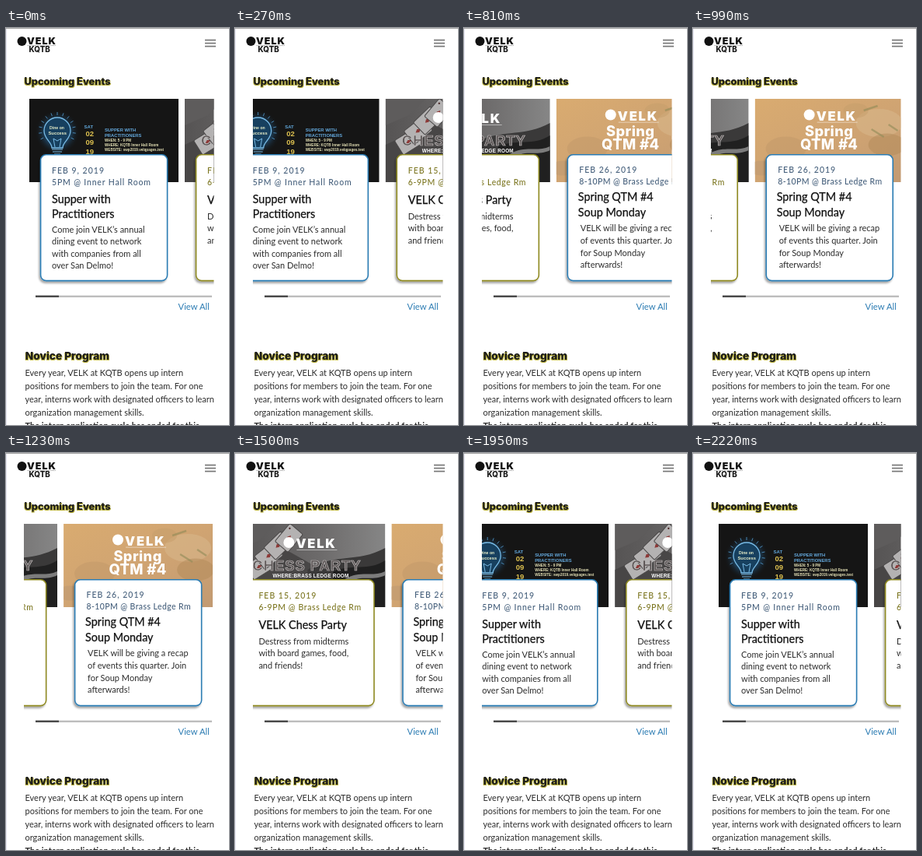
Animation of 287 by 510 pixels, one loop 2250 ms. Source, as an HTML page:

```html
<!DOCTYPE html>
<html lang="en">
<head>
<meta charset="utf-8">
<title>Upcoming Events</title>
<style>
  html, body { margin: 0; width: 100%; height: 100%; overflow: hidden; background: #fff; }
  svg { display: block; width: 287px; height: 510px; }
  text { font-family: Lato, "Open Sans", sans-serif; font-size: 11px; fill: #2c2c2c; white-space: pre; }
  .logo { font-family: Inter, sans-serif; font-weight: 900; fill: #111; }
  .head { font-family: Inter, sans-serif; font-weight: 800; fill: #1c1c1c; }
  .gold { fill: #b9b13a; }
  .title { font-size: 14.4px; fill: #111; stroke: #111; stroke-width: .25px; }
  .when { font-size: 10.5px; font-weight: 500; }
  .tiny { font-family: "Liberation Sans", Arial, sans-serif; font-weight: bold; }
  .white { fill: #fff; }
</style>
</head>
<body>
<svg viewBox="0 0 287 510">
  <defs>
    <clipPath id="view"><rect x="23" y="88" width="244.5" height="246"/></clipPath>
    <clipPath id="photo"><rect y="91" width="192" height="107"/></clipPath>
    <linearGradient id="grey">
      <stop offset="0" stop-color="#565454"/><stop offset=".55" stop-color="#6c6a6a"/><stop offset="1" stop-color="#868686"/>
    </linearGradient>
    <linearGradient id="tan" x2="1" y2="1">
      <stop offset="0" stop-color="#d9ab70"/><stop offset=".5" stop-color="#d0a472"/><stop offset="1" stop-color="#c29a72"/>
    </linearGradient>
    <radialGradient id="glow">
      <stop offset="0" stop-color="#2a5f88"/><stop offset=".6" stop-color="#1c3a52"/><stop offset="1" stop-color="#141414" stop-opacity="0"/>
    </radialGradient>
    <filter id="shade" x="-10%" y="-10%" width="120%" height="120%">
      <feDropShadow dx="-1.5" dy="2.5" stdDeviation="1.2" flood-color="#000" flood-opacity=".35"/>
    </filter>
  </defs>
  <g id="page"></g>
  <g clip-path="url(#view)"><g id="track"></g></g>
</svg>
<script>
const LOOP = 2250, PITCH = 200;
const BLUE = '#2c7cb3', OLIVE = '#8f8a22', SLATE = '#46607c';

const text = (x, y, str, cls = '', attrs = '') =>
  `<text x="${x}" y="${y}" class="${cls}" style="${attrs}">${str}</text>`;
const lines = (x, y, step, rows, cls, attrs) =>
  rows.map((row, i) => text(x, y + i * step, row, cls, attrs)).join('');
const rect = (x, y, w, h, fill, rest = '') =>
  `<rect x="${x}" y="${y}" width="${w}" height="${h}" fill="${fill}" ${rest}/>`;
const dot = (x, y, r, fill) => `<circle cx="${x}" cy="${y}" r="${r}" fill="${fill}"/>`;
const path = (d, fill, rest = '') => `<path d="${d}" fill="${fill}" ${rest}/>`;

const heading = (x, y, size, str) =>
  [[-.8, 1], [.9, 1.1]].map(([dx, dy]) => text(x + dx, y + dy, str, 'head gold', `font-size:${size}px`)).join('') +
  text(x, y, str, 'head', `font-size:${size}px`);

const whiteLogo = (x, y) => dot(x, y - 7, 7, '#fff') +
  text(x + 9, y, 'VELK', 'logo white', 'font-size:16.5px;letter-spacing:1.8px') +
  rect(x + 10, y + 2.2, 52, .8, '#fff', 'opacity=".6"');

function supperPoster() {
  let rays = '';
  for (let i = 0; i < 13; i++) {
    const a = Math.PI * (.85 + i * 1.3 / 12), c = Math.cos(a), s = Math.sin(a);
    rays += `M${36 + 20 * c} ${132 + 20 * s}L${36 + 24 * c} ${132 + 24 * s}`;
  }
  return rect(0, 91, 192, 107, '#151515') +
    dot(36, 134, 29, 'url(#glow)') +
    path(rays, 'none', 'stroke="#4d92c4" stroke-width=".9"') +
    path('M29 154C29 146 19 143 19 132A17 17 0 0 1 53 132C53 143 43 146 43 154Z', '#17405f', 'stroke="#78bbe6" stroke-width="1.3"') +
    path('M29 156H43M30 159H42M32 162H40M33 153L31 142L36 145L41 142L39 153', 'none', 'stroke="#78bbe6" stroke-width="1"') +
    text(26, 130, 'Dine on', 'tiny', 'font-size:5.2px;fill:#e6edc8') +
    text(24.5, 136.5, 'Success', 'tiny', 'font-size:5.8px;fill:#e6edc8') +
    text(70.5, 129, 'SAT', 'tiny', 'font-size:6px;fill:#62a8dc') +
    lines(72.5, 139, 11.4, ['02', '09', '19'], 'tiny', 'font-size:9.5px;fill:#dcc050') +
    lines(97, 133, 7, ['SUPPER WITH', 'PRACTITIONERS'], 'tiny', 'font-size:5.8px;fill:#64a9dd') +
    lines(97, 146.4, 5.7, ['WHEN: 5 - 9 PM', 'WHERE: KQTB Inner Hall Room', 'WEBSITE: swp2019.velqpages.test'],
      'tiny', 'font-size:4.6px;fill:#e3dfb4');
}

function chessPoster() {
  const card = (x, y, a) => `<g transform="translate(${x} ${y}) rotate(${a})">` +
    rect(-11, -15, 22, 30, '#b4b2b2', 'rx="2" stroke="#4a4848" stroke-width="1"') +
    path('M0 -4L2.5 0L0 4L-2.5 0Z', '#8d3a38') + dot(-7, -10, 1.2, '#4a2a2a') + '</g>';
  return rect(0, 91, 192, 107, 'url(#grey)') +
    path('M0 125L30 112L52 91H0Z', '#5e5c5c') +
    path('M0 198V150L60 122L110 150V198Z', '#484646') +
    card(30, 146, 58) + card(42, 132, 52) + card(54, 119, 46) + card(68, 109, 40) +
    path('M92 150C125 128 155 142 192 122V198H92Z', '#3a3939') +
    path('M125 152C150 142 170 152 192 138V198H125Z', '#202020') +
    path('M140 162C160 150 175 160 192 152V157C176 165 160 156 146 166Z', '#7c7c7c') +
    whiteLogo(68, 122) +
    text(21, 151, 'CHESS PARTY', 'tiny', 'font-size:18.5px;letter-spacing:.9px;fill:#5c5656;stroke:#c4c0c0;stroke-width:.7px') +
    text(47, 159.5, 'WHERE:BRASS LEDGE ROOM', 'tiny white', 'font-size:6.4px;letter-spacing:.2px');
}

function springPoster() {
  const blobs = [[40, 155, 26, '#c39a6a'], [160, 122, 30, '#d9b88c'], [170, 150, 24, '#b58c5c'],
    [130, 106, 16, '#c69e6c'], [8, 180, 16, '#bd9a74']];
  return rect(0, 91, 192, 107, 'url(#tan)') +
    blobs.map(([x, y, r, fill]) => `<ellipse cx="${x}" cy="${y}" rx="${r}" ry="${r * .6}" fill="${fill}" opacity=".55"/>`).join('') +
    path('M140 106L158 100M150 130L166 140M172 124L184 132', 'none', 'stroke="#8f8a58" stroke-width="2.5" opacity=".6"') +
    whiteLogo(70, 118.5) +
    lines(95.5, 138.5, 17, ['Spring', 'QTM #4'], 'head white', 'font-size:18.3px;letter-spacing:.4px;text-anchor:middle');
}

const panel = (i, poster, edge, copy) => `<g transform="translate(${i * PITCH} 0)">
  <g clip-path="url(#photo)">${poster}</g>
  ${rect(14.6, 162.8, 163, 161.8, '#fff', `rx="7" stroke="${edge}" stroke-width="1.6" filter="url(#shade)"`)}
  ${copy}</g>`;

const when = (x, y, date, place, fill, gap) =>
  text(x, y, date, 'when', `fill:${fill};letter-spacing:1px`) +
  text(x, y + 15, place, 'when', `fill:${fill};letter-spacing:${gap}px`);

document.getElementById('page').innerHTML =
  rect(0, 0, 287, 510, '#fff') + rect(0, 0, 287, 1, '#a3a3a3') + rect(0, 1, 1, 509, '#e6e6f2') +
  dot(20.5, 17, 6, '#111') +
  text(27, 20.8, 'VELK', 'logo', 'font-size:12.4px;letter-spacing:1px') +
  text(27, 23.2, 'Able league of bright young makers', 'tiny', 'font-size:2.2px;fill:#777') +
  text(29.5, 31, 'KQTB', 'head', 'font-size:9.8px') +
  [14.7, 18.7, 22.7].map(y => rect(256, y, 14, 1.7, '#777')).join('') +
  heading(23.5, 72.6, 12.8, 'Upcoming Events') +
  rect(38, 343.6, 227, 2.4, '#bdbdbd') + rect(38, 343.6, 30, 2.4, '#4a4a4a') +
  text(221.5, 362, 'View All', '', `font-size:11.3px;fill:${BLUE}`) +
  heading(24.8, 425.6, 13.7, 'Novice Program') +
  lines(24.5, 447, 17, ['Every year, VELK at KQTB opens up intern', 'positions for members to join the team. For one',
    'year, interns work with designated officers to learn', 'organization management skills.']) +
  text(24.5, 514.5, 'The intern application cycle has ended for this', '', 'font-weight:bold');

const track = document.getElementById('track');
track.innerHTML =
  panel(0, supperPoster(), BLUE,
    when(29, 187, 'FEB 9, 2019', '5PM @ Inner Hall Room', SLATE, .82) +
    lines(29, 224.5, 19.3, ['Supper with', 'Practitioners'], 'title') +
    lines(29, 263, 15.3, ['Come join VELK’s annual', 'dining event to network', 'with companies from all', 'over San Delmo!'])) +
  panel(1, chessPoster(), OLIVE,
    when(29, 187, 'FEB 15, 2019', '6-9PM @ Brass Ledge Rm', '#7d7722', .6) +
    text(29, 225.5, 'VELK Chess Party', 'title') +
    lines(29, 246, 15.3, ['Destress from midterms', 'with board games, food,', 'and friends!'])) +
  panel(2, springPoster(), BLUE,
    when(29.5, 186, 'FEB 26, 2019', '8-10PM @ Brass Ledge Rm', SLATE, .4) +
    lines(28, 222.4, 19.4, ['Spring QTM #4', 'Soup Monday'], 'title') +
    lines(31, 261, 15.8, ['VELK will be giving a recap', 'of events this quarter. Join', 'for Soup Monday', 'afterwards!']));

// Swipe path: time in ms, left edge of the first poster
const steps = [[0, 30], [60, 29], [480, -75], [810, -281], [1110, -330], [1230, -326],
  [1710, -76], [1950, -6], [2160, 32], [2220, 33], [LOOP, 33]];
const rate = i => (steps[i + 1][1] - steps[i][1]) / (steps[i + 1][0] - steps[i][0]);
const slopes = steps.map((_, i) => {
  if (!i || i === steps.length - 1) return 0;
  const a = rate(i - 1), b = rate(i);
  return a * b > 0 ? 2 * a * b / (a + b) : 0;
});

function scrollAt(t) {
  let i = 0;
  while (i < steps.length - 2 && t >= steps[i + 1][0]) i++;
  const [t0, x0] = steps[i], [t1, x1] = steps[i + 1];
  const h = t1 - t0, u = (t - t0) / h, v = 1 - u;
  return v * v * ((1 + 2 * u) * x0 + u * h * slopes[i]) +
    u * u * ((1 + 2 * v) * x1 - v * h * slopes[i + 1]);
}

const start = performance.now();
function draw(now) {
  const t = Math.max(0, now - start) % LOOP;
  track.setAttribute('transform', `translate(${scrollAt(t).toFixed(2)} 0)`);
  requestAnimationFrame(draw);
}
draw(start);
</script>
</body>
</html>
```
